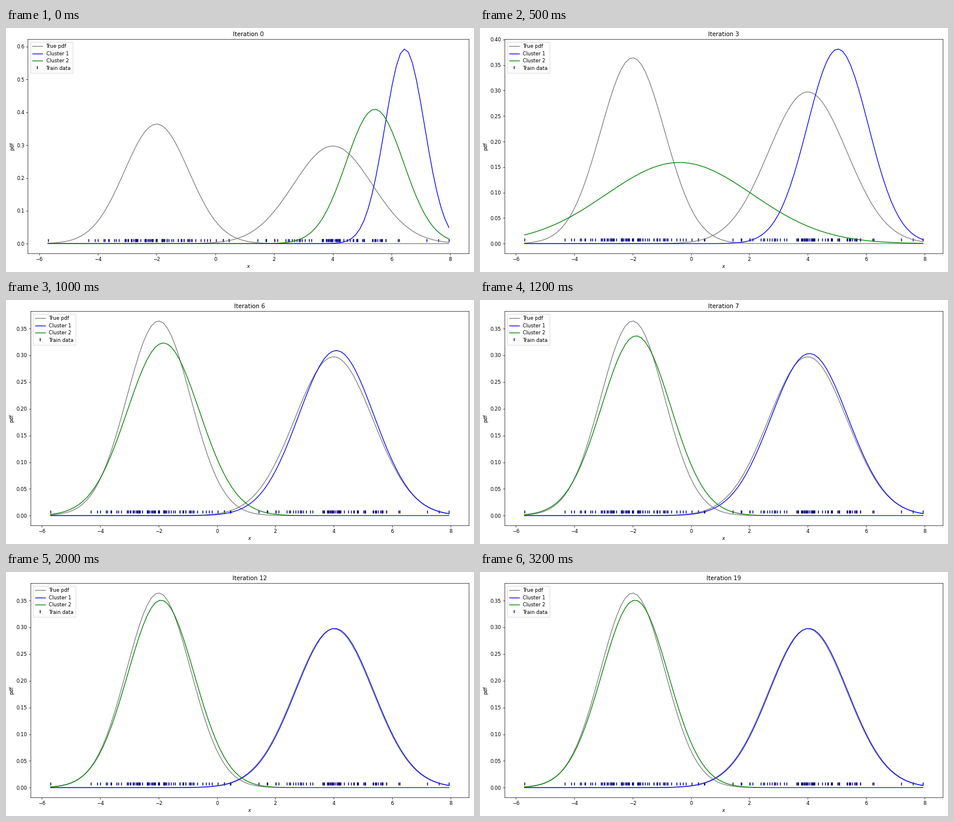
A matplotlib script that plays this animation: 800 px wide and 419 px high, repeating every 3.3 s.

```python
import numpy as np
import matplotlib.pyplot as plt
from matplotlib.animation import FuncAnimation
from matplotlib.markers import TICKUP

WIDTH, HEIGHT, DPI = 800, 419, 64
K = 0.95  # scale of all default point sizes

plt.rcParams.update({
    "font.family": "DejaVu Sans",
    "font.size": 10 * K,
    "axes.linewidth": 0.8 * K,
    "axes.titlepad": 6 * K,
    "axes.labelpad": 3.6 * K,
    "lines.linewidth": 1.5 * K,
    "patch.linewidth": K,
    "legend.labelspacing": 0.43,
})
for tick in ("xtick", "ytick"):
    plt.rcParams.update({
        f"{tick}.major.size": 3.5 * K,
        f"{tick}.major.pad": 3.5 * K,
        f"{tick}.major.width": 0.8 * K,
    })

X_MIN, X_MAX = -5.703, 7.953
TRUE = [(-2, np.sqrt(1.2)), (4, np.sqrt(1.8))]

# The fit moves between these iterations and has converged at the last one
KEY_ITERATIONS = [0, 1, 3, 6, 8]
CLUSTERS = {
    "blue": dict(mean=[6.45, 5.84, 5.034, 4.09, 4.03],
                 sigma=[0.673, 1.099, 1.046, 1.291, 1.339]),
    "green": dict(mean=[5.43, 0.90, -0.40, -1.84, -1.92],
                  sigma=[0.975, 3.16, 2.509, 1.235, 1.137]),
}


def pdf(x, mean, sigma):
    return np.exp(-((x - mean) / sigma) ** 2 / 2) / (sigma * np.sqrt(2 * np.pi))


def draw_samples(count=75):
    rng = np.random.default_rng(4)
    values = np.concatenate([rng.normal(*params, count) for params in TRUE])
    core = values[(values > -4.35) & (values < 6.5)]
    return np.r_[X_MIN, core, 7.2, 7.6, X_MAX]


x = np.linspace(X_MIN, X_MAX, 100)
true_curves = [pdf(x, *params) for params in TRUE]
true_peak = max(curve.max() for curve in true_curves)
samples = draw_samples()

fig = plt.figure(figsize=(WIDTH / DPI, HEIGHT / DPI), dpi=DPI, facecolor="white")
ax = fig.add_axes([0.05, 0.08, 0.9, 0.85])
for curve, label in zip(true_curves, ("True pdf", None)):
    ax.plot(x, curve, color="gray", label=label)
lines = [ax.plot(x, x * 0, color=color, label=f"Cluster {i}")[0]
         for i, color in enumerate(CLUSTERS, 1)]
ax.scatter(samples, np.full(samples.size, 0.005), s=30 * K**2, marker=TICKUP,
           color="navy", linewidths=1.75 * K, label="Train data")
margin = 0.05 * (X_MAX - X_MIN)
ax.set_xlim(X_MIN - margin, X_MAX + margin)
ax.set_xlabel("$x$")
ax.set_ylabel("pdf")
ax.legend(loc="upper left")
title = ax.set_title("")


def place_axes(left, right=791.4, top=19.4, bottom=387):
    ax.set_position([left / WIDTH, 1 - bottom / HEIGHT,
                     (right - left) / WIDTH, (bottom - top) / HEIGHT])


def update(frame):
    iteration = int((frame + 0.5) * 3 / 5)
    peak = true_peak
    for line, keys in zip(lines, CLUSTERS.values()):
        y = pdf(x, **{name: np.interp(iteration, KEY_ITERATIONS, values)
                      for name, values in keys.items()})
        line.set_ydata(y)
        peak = max(peak, y.max())
    ax.set_ylim(-0.05 * peak, 1.05 * peak)
    # one-decimal tick labels leave more room for the plot
    place_axes(37.3 if peak > 0.45 else 42.2)
    title.set_text(f"Iteration {iteration}")
    return lines


anim = FuncAnimation(fig, update, frames=33, interval=100, repeat=True,
                     repeat_delay=0, blit=False)
plt.show()
```
